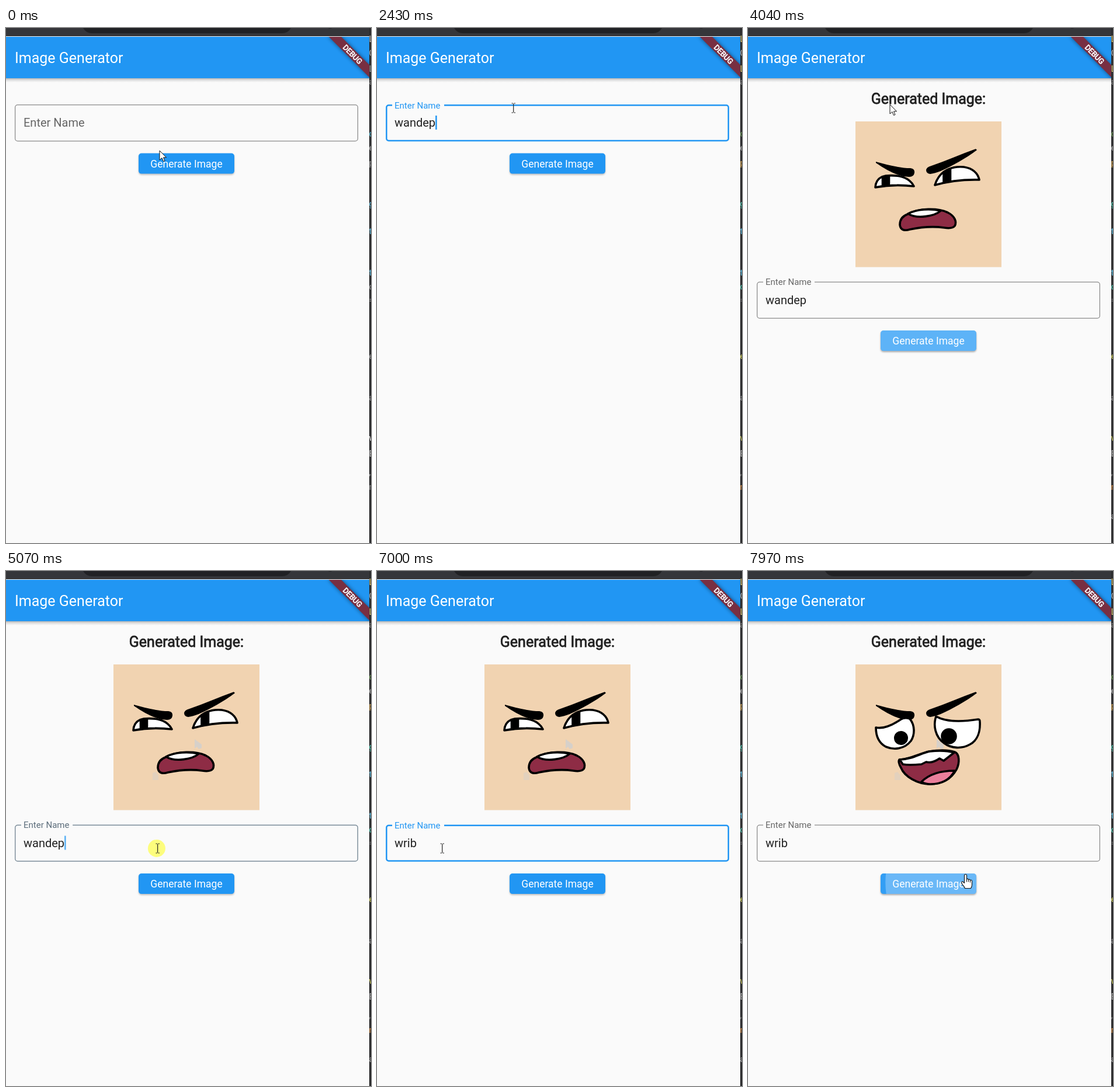
Recreate the animation shown at these times as an HTML page. Size 625x882 px, loop 8000 ms.

```html
<!DOCTYPE html>
<html lang="en">
<head>
<meta charset="utf-8">
<title>Image Generator</title>
<style>
html, body { margin: 0; width: 100%; height: 100%; overflow: hidden; background: #fafafa; }
svg { display: block; width: 100vw; height: 100vh; }
text { font-family: Roboto, sans-serif; white-space: pre; }
.ink { stroke: #000; stroke-width: 3.6; stroke-linejoin: round; }
</style>
</head>
<body>
<svg viewBox="0 0 625 882">
  <defs>
    <linearGradient id="barShade" x2="0" y2="1">
      <stop stop-opacity=".28"/><stop offset=".4" stop-opacity=".12"/><stop offset="1" stop-opacity="0"/>
    </linearGradient>
    <filter id="soft" x="-20%" y="-60%" width="140%" height="220%"><feGaussianBlur stdDeviation="1.6"/></filter>
    <filter id="glow" x="-20%" y="-100%" width="140%" height="300%"><feGaussianBlur stdDeviation="3.5"/></filter>
    <clipPath id="buttonClip"><rect x="227" y="214.6" width="164" height="35" rx="5"/></clipPath>
    <clipPath id="barClip"><rect y="15" width="622" height="71"/></clipPath>
    <clipPath id="stripClip"><rect x="622" width="3" height="882"/></clipPath>
  </defs>

  <rect width="625" height="882" fill="#fafafa"/>

  <g id="result">
    <text x="309" y="130" font-size="25" text-anchor="middle" fill="#212121" stroke="#212121" stroke-width=".8">Generated Image:</text>
    <rect x="184" y="160" width="250" height="249.5" fill="#f1d3b1"/>
    <path d="M219 229C240 235 262 240 278 240Q286 241 285 248Q284 255 276 255C256 254 240 245 219 231Z"/>
    <path d="M392 209C372 224 350 236 330 245Q320 249 312 250Q305 249 305 243Q306 238 314 236C340 227 365 216 390 207Z"/>
    <g id="smudge" fill="#d6d0c9">
      <path d="M323 288V304L327 301 330 305 335 303V297Z"/>
      <path d="M251 346L256 344 261 350V358H251Z" opacity=".5"/>
    </g>
    <g id="scowl" class="ink" fill="#fff">
      <path d="M218 273Q219 256 236 253C260 251 277 257 284 271Q250 267 218 273Z"/>
      <path d="M230.5 256L241.5 254V269L230.5 271Z" fill="#000"/>
      <path d="M320 269C326 250 340 240 358 238C380 236 393 246 396 260Q355 259 320 269Z"/>
      <path d="M335 248L346.5 241V262L335 265Z" fill="#000"/>
      <path d="M273 319C293 308 325 308 342 316C354 322 358 332 354 339C350 344 342 343 336 342C315 339 296 341 277 345C268 348 261 346 260 337C260 328 265 322 273 319Z" fill="#8e2c45"/>
      <path d="M274 318C290 310 312 309 330 313C320 322 290 328 274 318Z"/>
    </g>
    <g id="grin" class="ink" fill="#fff">
      <path d="M219 268C232 271 250 262 262 254Q268 250 277 253C286 264 286 280 279 291C268 305 250 307 236 301C223 294 219 281 219 268Z"/>
      <circle cx="262" cy="286" r="10.2" fill="#000"/>
      <path d="M322 249Q345 262 394 254Q397 254 397 258C398 275 393 290 380 297C366 305 348 304 336 295C320 284 317 264 322 249Z"/>
      <circle cx="344" cy="283" r="12" fill="#000"/>
      <path d="M259 323C275 323 295 312 310 309C330 306 345 307 354 310C362 313 363 328 357 340C347 358 330 365 312 365C290 365 268 352 262 337C258 330 257 326 259 323Z" fill="#8e2c45"/>
      <path d="M260 323C280 323 296 312 311 309Q336 306 353 311L335 325 328 321Q315 330 305 327L297 331Q275 333 265 331Z"/>
      <path d="M297 361Q316 342 354 342C346 357 331 365 312 365Q304 365 297 361Z" fill="#ea7e9b"/>
    </g>
  </g>

  <g id="form">
    <path id="border" fill="none"/>
    <text id="label" x="30">Enter Name</text>
    <rect id="selection" y="150" height="24.5" fill="#2196f3" fill-opacity=".4"/>
    <text id="entry" x="30" y="169" font-size="20" fill="#212121"></text>
    <rect id="caret" y="150" width="2.5" height="24" fill="#2196f3"/>
    <rect id="lift" x="227" y="216.4" width="164" height="35" rx="5" filter="url(#soft)"/>
    <rect x="227" y="214.6" width="164" height="35" rx="5" fill="#2196f3"/>
    <g clip-path="url(#buttonClip)" fill="#fff">
      <rect id="hover" x="227" y="214" width="164" height="36" opacity=".08"/>
      <circle id="ripple" cy="230"/>
    </g>
    <text x="309" y="238.5" font-size="17.5" text-anchor="middle" fill="#fff">Generate Image</text>
  </g>

  <rect y="86" width="622" height="7" fill="url(#barShade)"/>
  <rect width="622" height="15" fill="#35363a"/>
  <path d="M132 0Q137 9 148 9H472Q483 9 488 0Z" fill="#202124"/>
  <circle cx="555" cy="-5" r="6" fill="#202124"/>
  <rect y="13" width="622" height="1" fill="#292a2d"/>
  <rect y="14" width="622" height="1" fill="#f4f4f4"/>
  <rect y="15" width="622" height="71" fill="#2196f3"/>
  <text x="15" y="60" font-size="25" fill="#fff">Image Generator</text>
  <g clip-path="url(#barClip)">
    <g transform="translate(623.5 15) rotate(45)">
      <rect x="-50" y="35" width="100" height="15" opacity=".5" filter="url(#glow)"/>
      <rect x="-50" y="35" width="100" height="15" fill="#782f42"/>
      <text y="47" font-size="12.75" text-anchor="middle" fill="#fff" stroke="#fff" stroke-width=".7">DEBUG</text>
    </g>
  </g>

  <g id="strip" clip-path="url(#stripClip)">
    <rect x="622" width="3" height="882" fill="#2b2b2d"/>
    <rect id="marked" x="622" y="690" width="3" height="15" fill="#2f7fd0"/>
  </g>

  <g id="pointer">
    <circle id="press" r="15" fill="#ff0" opacity=".5"/>
    <path id="arrow" d="M0 0V16L4 12.5 6.5 18.5 9 17.5 6.5 11.8H11.5Z" fill="#fff" stroke="#111" stroke-width="1"/>
    <path id="beam" d="M-1.5-8H1M2.5-8H5M1.7-7.5V7.5M-1.5 8H1M2.5 8H5" fill="none" stroke="#222" stroke-width="1.2"/>
    <path id="hand" d="M-3 1Q-3-1-1-1T1 1V7Q3 6 4 8Q6 7 7 9Q10 8 10 11V17Q10 20 8 23H-2Q-3 20-6 17L-8 13Q-7 10-5 12L-3 14ZM1 7V12M4 8V12M7 9V13" fill="#fff" stroke="#111" stroke-width="1.1" stroke-linejoin="round"/>
  </g>
</svg>
<script>
const LOOP = 8000, SHIFT = 303.5;
const $ = id => document.getElementById(id);
const set = (id, attrs) => { for (const k in attrs) $(id).setAttribute(k, attrs[k]); };
const show = (id, on) => { $(id).style.display = on ? '' : 'none'; };
const lerp = (a, b, p) => a + (b - a) * p;
const ramp = (t, a, b) => Math.min(1, Math.max(0, (t - a) / (b - a)));
const smooth = p => p * p * (3 - 2 * p);
const within = (t, spans) => spans.some(([a, b]) => t >= a && t < b);
const mix = (a, b, p) => `rgb(${a.map((v, i) => Math.round(lerp(v, b[i], p)))})`;

const BLUE = [33, 150, 243];
const IMAGE_AT = 3750, GRIN_AT = 7930;
const TAPS = [[3550, 290], [7780, 374]];
const PRESSES = [[930, 1060], [3550, 3670], [5030, 5210], [7780, 7900]];
const CARET = [[930, 1390], [1900, 2930], [3430, 3550], [5040, 5140], [5910, 6970], [7470, 7780]];
const FIRST = ['wandep', [1900, 1990, 2080, 2160, 2300, 2430]];
const SECOND = ['wrib', [5910, 6090, 6300, 6460]];
const PATH = [
  [30, 263, 210], [830, 232, 137], [2950, 232, 137], [3450, 290, 232], [3720, 290, 232],
  [4030, 243, 131], [4100, 243, 131], [4400, 323, 288], [4540, 306, 350], [4880, 258, 475],
  [5070, 258, 475], [5190, 22, 475], [7000, 110, 475], [7400, 300, 500], [7700, 373.5, 520.5]
];

// Slivers of the editor behind the window: y, glyph, early colour, later colour
const CODE = [
  [24, 'L', '#bbb', '#d8c470'], [48, 'C', '#aaa', '#aaa'], [75, 'L', '#999', '#d8c470'], [97, 'a', '#888', '#888'],
  [186, 'c', '#4db6d0', '#6a9955'], [210, 'e', '#aaa', '#aaa'], [236, 'p', '#999', '#d0a050'],
  [306, 'g', '#5fb7d8', '#4ec9b0'], [353, 't', '#5fb7d8', '#5fb7d8'], [424, 't', '#5fb7d8', '#5fb7d8'],
  [448, 'c', '#999', '#4ec9b0'], [471, '=', '#999', '#777'], [567, 'e', '#999', '#c9c95a'],
  [638, 'a', '#999', '#999'], [707, 'w', '#eee', '#c9c95a'], [734, 'E', '#bbb', '#aaa'],
  [766, ',', '#aaa', '#888'], [791, 'r', '#888', '#d08a45'], [841, 'a', 'none', '#aaa']
];
const glyphs = CODE.map(([y, char]) => {
  const el = document.createElementNS('http://www.w3.org/2000/svg', 'text');
  el.textContent = char;
  el.setAttribute('x', 621.5);
  el.setAttribute('y', y);
  el.setAttribute('font-size', 15);
  return $('strip').appendChild(el);
});

function pointerAt(t) {
  const i = PATH.findIndex(k => k[0] > t);
  if (i === 0) return PATH[0].slice(1);
  if (i < 0) return PATH[PATH.length - 1].slice(1);
  const a = PATH[i - 1], b = PATH[i], p = smooth(ramp(t, a[0], b[0]));
  return [lerp(a[1], b[1], p), lerp(a[2], b[2], p)];
}

function typed(t) {
  const [word, times] = t < SECOND[1][0] ? FIRST : SECOND;
  return word.slice(0, times.filter(k => k <= t).length);
}

function drawField(t, pointerX) {
  const focus = smooth(ramp(t, 920, 1060)) - smooth(ramp(t, 3550, 3700))
    + smooth(ramp(t, 5030, 5200)) - smooth(ramp(t, 7780, 7930));
  const float = smooth(ramp(t, 920, 1060));
  const width = lerp(1.25, 2.5, focus), h = width / 2;
  const left = 15 + h, right = 603 - h, top = 131 + h, bottom = 194.2 - h, r = 5 - h;
  const gapEnd = 26 + lerp(88, 89, focus) * float;
  const arc = (x, y) => `A${r} ${r} 0 0 1 ${x} ${y}`;
  set('border', {
    d: `M${gapEnd} ${top}H${right - r}${arc(right, top + r)}V${bottom - r}${arc(right - r, bottom)}`
      + `H${left + r}${arc(left, bottom - r)}V${top + r}${arc(left + r, top)}H26`,
    stroke: mix([138, 138, 138], BLUE, focus), 'stroke-width': width
  });
  set('label', {
    y: lerp(169, 136.7 + .8 * focus, float), 'font-size': lerp(20, 15, float),
    fill: mix([102, 102, 102], BLUE, focus)
  });

  const entry = $('entry'), word = typed(t);
  if (entry.textContent !== word) entry.textContent = word;
  const end = 30 + (word ? entry.getComputedTextLength() : 0);
  set('caret', { x: end, opacity: t >= 5030 && t < 5140 ? .75 : 1 });
  show('caret', within(t, CARET));
  const start = t >= 5210 ? 30 : Math.max(30, pointerX);
  set('selection', { x: start, width: Math.max(0, end - start) });
  show('selection', t >= 5070 && t < 5910 && start < end);
}

function drawButton(t, hovered) {
  const [start, x] = TAPS[t < TAPS[1][0] ? 0 : 1];
  const age = t - start;
  const active = age >= 0 && age < 850;
  set('ripple', { cx: x, r: active ? Math.min(180, 5 + age * .7) : 0, opacity: .27 * (1 - ramp(age, 500, 850)) });
  show('hover', hovered);
  set('lift', { opacity: active ? .32 : .24 });
}

function draw(t) {
  const hasImage = t >= IMAGE_AT;
  const shift = hasImage ? SHIFT : 0;
  const [x, y] = pointerAt(t);
  const localY = y - shift;
  const visible = t < 5210 || t >= 7000;
  const overField = x >= 15 && x <= 603 && localY >= 131 && localY <= 194.2;
  const overButton = visible && x >= 227 && x <= 391 && localY >= 214.6 && localY <= 249.6;
  const dragging = t >= 5070 && t < 5210;

  show('result', hasImage);
  show('scowl', t < GRIN_AT);
  show('grin', t >= GRIN_AT);
  show('smudge', t >= 4430);
  set('form', { transform: `translate(0 ${shift})` });
  drawField(t, x);
  drawButton(t, overButton);

  set('pointer', { transform: `translate(${x} ${y})` });
  show('pointer', visible);
  show('press', within(t, PRESSES));
  show('beam', overField || dragging);
  show('hand', overButton);
  show('arrow', !overField && !overButton && !dragging);

  glyphs.forEach((el, i) => {
    const [glyphY, , early, later] = CODE[i];
    el.setAttribute('fill', t >= (glyphY > 800 ? IMAGE_AT : 500) ? later : early);
  });
  show('marked', t >= 7400 && t < 7850);
}

function tick(now) {
  draw(now % LOOP);
  requestAnimationFrame(tick);
}
draw(0);
requestAnimationFrame(tick);
</script>
</body>
</html>
```
